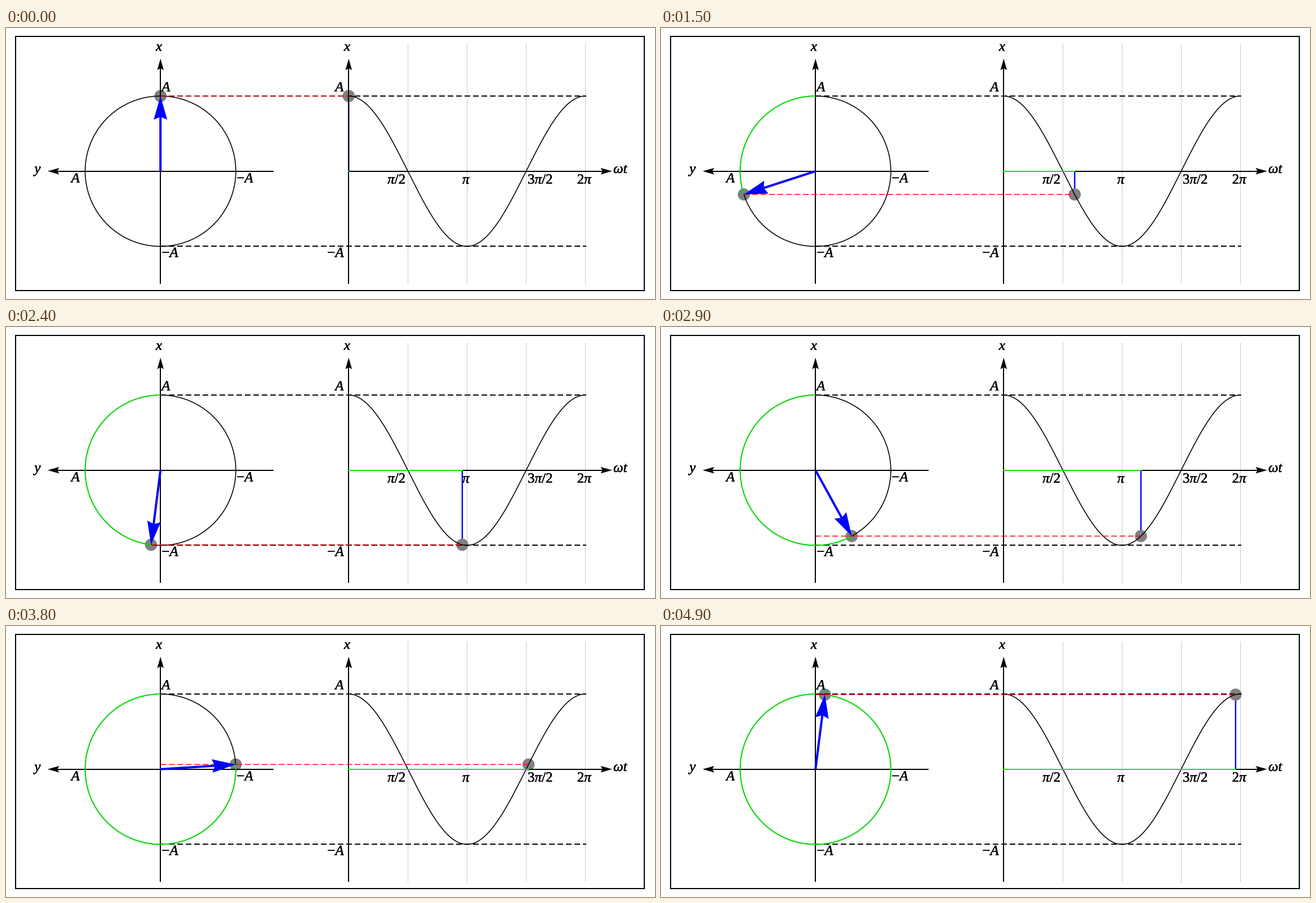
Write a matplotlib script that moves like this. It is 1152x482 px and loops after 5000 ms.

```python
import numpy as np
import matplotlib.pyplot as plt
from matplotlib.animation import FuncAnimation
from matplotlib.patches import Circle, Polygon, Rectangle
from matplotlib.patheffects import withStroke

plt.rcParams.update({
    "mathtext.fontset": "custom",
    "mathtext.rm": "Liberation Serif",
    "mathtext.it": "Liberation Serif:italic",
})

W, H, DPI = 1152, 482, 100
PT = 72 / DPI              # points per pixel
FRAMES = 50
CX, CY, R = 274.2, 254.7, 133.7   # phasor circle
X0, PERIOD = 608.3, 420           # cosine plot

fig = plt.figure(figsize=(W / DPI, H / DPI), dpi=DPI, facecolor="white")
ax = fig.add_axes([0, 0, 1, 1])
ax.set_xlim(0, W)
ax.set_ylim(H, 0)
ax.axis("off")


def line(xs, ys, color="black", width=2.0, z=3, **kw):
    kw.setdefault("solid_capstyle", "butt")
    return ax.plot(xs, ys, color=color, lw=width * PT, zorder=z, **kw)[0]


def dashed(xs, ys, color="black", width=2.0, z=3, **kw):
    pattern = (0, (10 / width, 5 / width))
    return line(xs, ys, color, width, z, ls=pattern, dash_capstyle="butt", **kw)


def head_points(tip, angle, length, half, notch):
    """Barbed arrowhead pointing along angle."""
    shape = np.array([(0, 0), (-length, half), (-notch, 0), (-length, -half)])
    c, s = np.cos(angle), np.sin(angle)
    return shape @ np.array([(c, s), (-s, c)]) + tip


def axis_arrow(start, tip):
    (xa, ya), (xb, yb) = start, tip
    angle = np.arctan2(yb - ya, xb - xa)
    back = np.array(tip) - 12 * np.array([np.cos(angle), np.sin(angle)])
    line([xa, back[0]], [ya, back[1]])
    ax.add_patch(Polygon(head_points(tip, angle, 20.5, 5.8, 17), fc="black",
                         lw=0, zorder=3))


def label(x, y, text):
    ax.text(x, y, f"${text}$", size=25 * PT, ha="center", va="baseline",
            zorder=8,
            path_effects=[withStroke(linewidth=0.5 * PT, foreground="black")])


def arc(turn):
    """Points on the circle from the top, counterclockwise on screen."""
    a = np.linspace(0, turn, 200)
    return CX - R * np.sin(a), CY - R * np.cos(a)


# Frame and grid
ax.add_patch(Rectangle((17, 15), 1116, 452, fill=False, ec="black",
                       lw=2 * PT, zorder=3))
for k in range(1, 5):
    x = X0 + k * PERIOD / 4
    line([x, x], [27, 455], "#c8c8c8", 1, z=0)

# Axes, circle and curve
axis_arrow((475, CY), (74, CY))
axis_arrow((CX, 455), (CX, 54.5))
axis_arrow((X0, CY), (1076, CY))
axis_arrow((X0, 455), (X0, 54.5))
for y in (CY - R, CY + R):
    dashed([CX, 1030], [y, y])
line(*arc(2 * np.pi), width=1.6)
phase = np.linspace(0, 2 * np.pi, 300)
line(X0 + PERIOD * phase / (2 * np.pi), CY - R * np.cos(phase), width=1.6)

# Labels
label(272.5, 40.5, "x")
label(606.5, 40.5, "x")
label(58, 258, "y")
label(1091.5, 258, r"\omega t")
label(285.5, 113, "A")
label(593.5, 113, "A")
label(125, 275, "A")
label(425, 275, "-A")
label(292, 407.5, "-A")
label(586, 407.5, "-A")
label(693.5, 277, r"\pi/2")
label(817.5, 277, r"\pi")
label(948.5, 277, r"3\pi/2")
label(1027.5, 277, r"2\pi")

# Moving parts
drop = line([], [], "blue", 2.4, z=1, snap=False)
balls = [ax.add_patch(Circle((0, 0), 10.8, fc="#808080", lw=0, zorder=2))
         for _ in range(2)]
swept = line([], [], "#00f000", 1.8, z=4)
elapsed = line([], [], "#00f000", 2, z=4)
link = dashed([], [], "red", 1.5, z=5, snap=False)
shaft = line([], [], "blue", 4, z=6, snap=False)
head = ax.add_patch(Polygon(np.zeros((4, 2)), fc="blue", lw=0, zorder=6))


def update(i):
    turn = 2 * np.pi * i / FRAMES
    px, py = CX - R * np.sin(turn), CY - R * np.cos(turn)
    tx = X0 + PERIOD * i / FRAMES

    balls[0].center = px, py
    balls[1].center = tx, py
    drop.set_data([tx, tx], [CY, py])
    swept.set_data(*arc(turn))
    elapsed.set_data([X0 - 1, tx + 1], [CY, CY])
    link.set_data([min(px, CX), tx], [py, py])

    angle = np.arctan2(py - CY, px - CX)
    points = head_points((px, py), angle, 42, 12, 37)
    head.set_xy(points)
    shaft.set_data([CX, points[2][0]], [CY, points[2][1]])
    return [drop, *balls, swept, elapsed, link, shaft, head]


anim = FuncAnimation(fig, update, frames=FRAMES, interval=100,
                     repeat=True, repeat_delay=0, blit=False)
plt.show()
```
